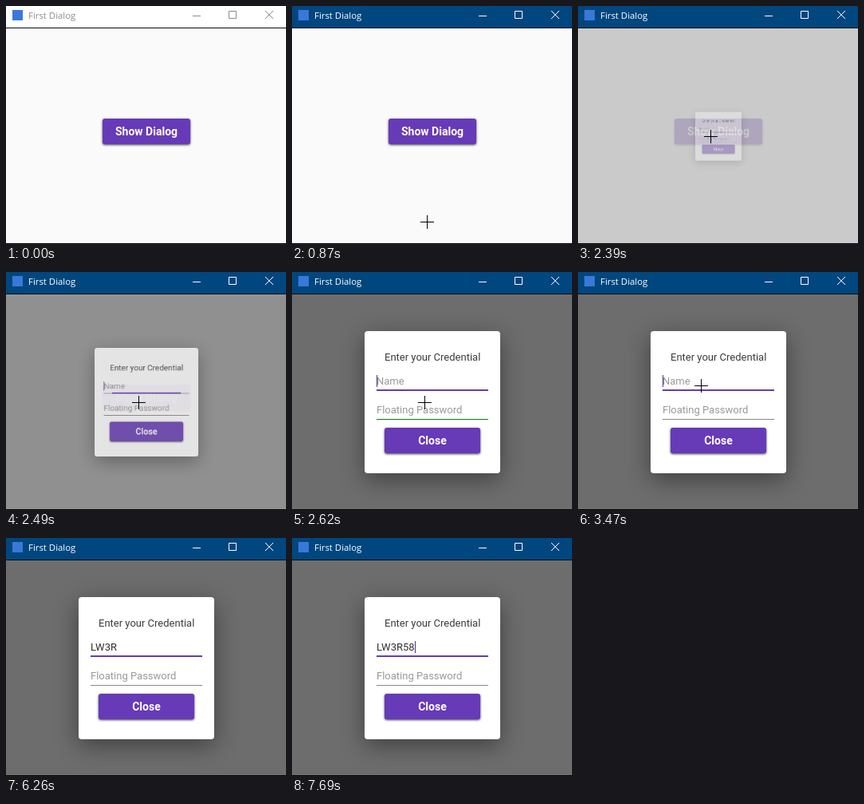
Write an HTML page that moves like this. It is 351 px wide and 298 px high and loops after 8000 ms.

```html
<!DOCTYPE html>
<html lang="en">
<head>
<meta charset="utf-8">
<title>First Dialog</title>
<style>
  html, body { margin: 0; width: 100%; height: 100%; overflow: hidden; }
  body { position: relative; width: 351px; height: 298px; background: #fafafa; font: 13px/16px Roboto, sans-serif; }
  div, svg { position: absolute; box-sizing: border-box; white-space: pre; }

  /* every animation shares one 8 s loop */
  .bar, .show, .shade, .card, .focus, .hover, .hint, .typed, .caret, .cursor {
    animation: 8s step-end infinite;
  }

  .bar { left: 0; top: 0; width: 351px; height: 28px; border-bottom: 1px solid #060a10; animation-name: activate; }
  .icon { left: 8px; top: 5px; width: 13px; height: 13px; background: #3a78d8; }
  .title { left: 28px; top: 4px; font: 11.4px/16px "Open Sans", "Noto Sans", sans-serif; }
  .controls { left: 0; top: 0; fill: none; stroke: currentColor; }
  .floor { left: 0; top: 297px; width: 351px; height: 1px; background: #000; }

  .button {
    height: 32px; border-radius: 3px; background: #673ab7; color: #fff;
    font-weight: 700; font-size: 14px; line-height: 32px; text-align: center;
    box-shadow: 0 1px 3px rgba(0, 0, 0, .75);
  }
  .show { left: 121px; top: 141px; width: 110px; animation-name: disable; }
  .close { left: 25px; top: 121px; width: 120px; }

  .shade { left: 0; top: 28px; width: 351px; height: 269px; background: rgba(0, 0, 0, .56); animation-name: fade; }
  .card {
    left: 91px; top: 74px; width: 170px; height: 178px; border-radius: 4px; background: #fff;
    box-shadow: 0 8px 30px rgba(0, 0, 0, .42); animation-name: pop;
  }
  .heading { left: 25px; top: 25px; color: #3c3c3c; }
  .name { left: 15px; top: 55px; }
  .password { left: 15px; top: 91px; }
  .faint { color: #999; }
  .hint { animation-name: clear; }
  .line { left: 15px; width: 140px; height: 1px; background: #888; }
  .line.first { top: 74px; }
  .line.second { top: 110px; }
  .focus { left: 15px; top: 73px; width: 140px; height: 2px; background: #673ab7; animation-name: grow; }
  .hover { animation-name: hover; }
  .typed { height: 16px; overflow: hidden; color: #303030; animation-name: type; }
  .caret { left: 15px; top: 55px; width: 1px; height: 15px; background: #503088; animation-name: blink, advance; }

  .cursor { left: -8px; top: -8px; width: 17px; height: 17px; animation-name: travel; animation-timing-function: linear; }

  @keyframes activate {
    0% { background: #fff; color: #8c8c8c; }
    1%, 100% { background: #00467f; color: #fff; }
  }
  @keyframes disable {
    0% { opacity: 1; }
    29.075%, 100% { opacity: .23; }
  }
  @keyframes fade {
    0% { opacity: 0; }
    29.075% { opacity: 0; animation-timing-function: cubic-bezier(.61, 1, .88, 1); }
    32.75%, 100% { opacity: 1; }
  }
  @keyframes pop {
    0% { opacity: 0; transform: scale(0); }
    29.075% { opacity: 0; transform: scale(0); animation-timing-function: cubic-bezier(.61, 1, .88, 1); }
    32.75%, 100% { opacity: 1; transform: none; }
  }
  @keyframes grow {
    0% { transform: scaleX(0); }
    29.125% { transform: scaleX(0); animation-timing-function: linear; }
    31.625%, 100% { transform: none; }
  }
  @keyframes hover {
    0%, 40%, 100% { background: #888; }
    32.375% { background: #008000; }
  }
  @keyframes clear {
    0% { opacity: 1; }
    59.1%, 100% { opacity: 0; }
  }
  @keyframes type {
    0% { width: 0; }
    59.1% { width: 7px; }
    63.55% { width: 18.7px; }
    67.2% { width: 26px; }
    71.2% { width: 34px; }
    82.3% { width: 41.3px; }
    82.9%, 100% { width: 52px; }
  }
  @keyframes advance {
    0% { transform: none; }
    59.45% { transform: translateX(7px); }
    64.35% { transform: translateX(18px); }
    67.2% { transform: translateX(25px); }
    71.2% { transform: translateX(33px); }
    82.9% { transform: translateX(41px); }
    83.3%, 100% { transform: translateX(48px); }
  }
  @keyframes blink {
    0%, 43.35%, 56.6%, 82.35%, 96.05%, 100% { opacity: 1; }
    37.25%, 49.25%, 78.25%, 90.35% { opacity: 0; }
  }
  @keyframes travel {
    0%, 1% { transform: translate(230px, 310px); }
    10.8%, 16.75% { transform: translate(169px, 270px); }
    20% { transform: translate(157px, 232px); }
    22.25% { transform: translate(165px, 173px); }
    23% { transform: translate(169px, 180px); animation-timing-function: step-end; }
    24.75% { transform: translate(168px, 171px); animation-timing-function: step-end; }
    28.85%, 35.75% { transform: translate(166px, 163px); }
    43.35% { transform: translate(154px, 142px); animation-timing-function: step-end; }
    59.1%, 100% { transform: translate(154px, -40px); }
  }
</style>
</head>
<body>
  <div class="bar">
    <div class="icon"></div>
    <div class="title">First Dialog</div>
    <svg class="controls" width="351" height="27">
      <path d="M234 12.5h10M279.5 6.5h9v9h-9zM325 6l10 10M335 6l-10 10"/>
    </svg>
  </div>

  <div class="button show">Show Dialog</div>
  <div class="shade"></div>

  <div class="card">
    <div class="heading">Enter your Credential</div>
    <div class="name faint hint">Name</div>
    <div class="name typed">LW3R58</div>
    <div class="line first"></div>
    <div class="focus"></div>
    <div class="caret"></div>
    <div class="password faint">Floating Password</div>
    <div class="line second hover"></div>
    <div class="button close">Close</div>
  </div>

  <div class="floor"></div>
  <svg class="cursor" viewBox="0 0 17 17"><path d="M0 8.5h17M8.5 0v17" stroke="#000"/></svg>
</body>
</html>
```
